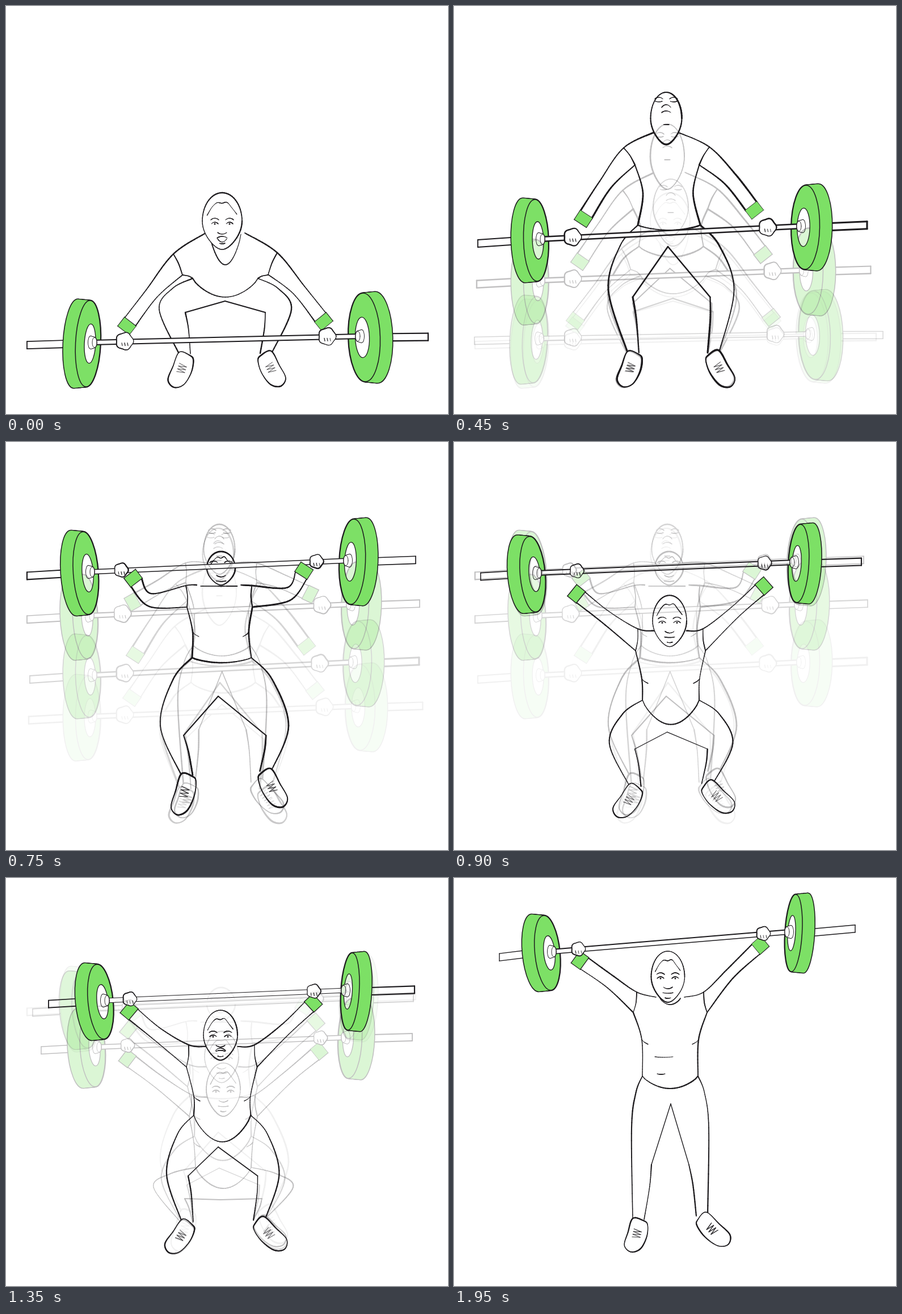
An HTML page with a canvas that plays this animation: 779 px wide and 719 px high, repeating every 2.45 s.

```html
<!DOCTYPE html>
<html lang="en">
<head>
<meta charset="utf-8">
<title>Snatch lift</title>
<style>
html, body { margin: 0; width: 100%; height: 100%; overflow: hidden; background: #fff; }
canvas { display: block; }
</style>
</head>
<body>
<canvas id="stage" width="779" height="719"></canvas>
<script>
const W = 779, H = 719, STEP = 150, LOOP = 2450;
const INK = '#1d1b1e', GREEN = '#7de066';
const stage = document.getElementById('stage').getContext('2d');
let g;

// ---- geometry ----
const add = (a, b) => [a[0] + b[0], a[1] + b[1]];
const lerp = (a, b, t) => a + (b - a) * t;
const clamp = v => Math.max(0, Math.min(1, v));
const range = (n, f) => Array.from({ length: n + 1 }, (_, i) => f(i / n));

// Unit vector from a to b, and its normal
function frame(a, b) {
  const len = Math.hypot(b[0] - a[0], b[1] - a[1]);
  const d = [(b[0] - a[0]) / len, (b[1] - a[1]) / len];
  return { len, d, n: [-d[1], d[0]] };
}

// Catmull-Rom curve through p
function smooth(p, closed) {
  const n = p.length, segs = closed ? n : n - 1;
  const at = i => closed ? p[(i + n) % n] : p[Math.max(0, Math.min(n - 1, i))];
  return range(segs * 12, v => {
    const i = Math.min(segs - 1, Math.floor(v * segs)), t = v * segs - i;
    const [a, b, c, d] = [at(i - 1), at(i), at(i + 1), at(i + 2)];
    return [0, 1].map(j => b[j] + 0.5 * t * (c[j] - a[j] + t * (2 * a[j] - 5 * b[j] + 4 * c[j] - d[j]
      + t * (3 * (b[j] - c[j]) + d[j] - a[j]))));
  });
}

// Sagging line between two points
function sag(a, b, depth) {
  return range(24, t => [lerp(a[0], b[0], t), lerp(a[1], b[1], t) + depth * Math.sin(Math.PI * t) ** 0.75]);
}

// ---- strokes ----
function trace(pts) {
  g.beginPath();
  pts.forEach(p => g.lineTo(p[0], p[1]));
}

// Ink line whose pressure drifts along the way
function pen(pts, w) {
  for (let i = 1; i < pts.length; i++) {
    trace([pts[i - 1], pts[i]]);
    g.lineWidth = w * (0.95 + 0.25 * Math.sin(i * 0.14 + pts[0][0]));
    g.stroke();
  }
}

function erase(fill) {
  g.globalCompositeOperation = 'destination-out';
  fill();
  g.globalCompositeOperation = 'source-over';
}

function hollow(pts, w) {
  trace(pts);
  erase(() => g.fill());
  pen(pts, w);
}

function oval(x, y, rx, ry, rot = 0) {
  g.beginPath();
  g.ellipse(x, y, rx, ry, rot, 0, 7);
}

// ---- barbell ----
function drum(back, front, rx, ry, rot, color, w) {
  const each = paint => range(12, t => {
    oval(lerp(back[0], front[0], t), lerp(back[1], front[1], t), rx, ry - 2 * t, rot);
    paint();
  });
  g.lineWidth = w * 2;
  each(() => g.stroke());
  g.fillStyle = color || '#000';
  if (color) each(() => g.fill());
  else erase(() => each(() => g.fill()));
  oval(front[0], front[1], rx, ry - 2, rot);
  g.lineWidth = w;
  g.stroke();
}

function rod(a, b, half, w) {
  const up = [0, -half], down = [0, half];
  hollow([add(a, up), add(b, up), add(b, down), add(a, down), add(a, up)], w);
}

function plate(hub, side, rx, ry, rot) {
  const front = add(hub, [side * 7.5, 2]);
  drum(add(front, [side * 21.5, 0]), front, rx - 1, ry - 1, rot, GREEN, 1.5);
  oval(hub[0] + side * 4, hub[1] + 2, rx * 0.43, ry * 0.44, rot);
  erase(() => g.fill());
  g.lineWidth = 1.3;
  g.stroke();
}

const slope = ({ bar }) => (bar[4] - bar[2]) / (bar[3] - bar[1]);
const barY = (p, x) => p.bar[2] + slope(p) * (x - p.bar[1]);

function barbell(p) {
  const [x0, lx, ly, rx, ry, x1] = p.bar, [size, wide, tilt] = p.disc;
  rod([x0, barY(p, x0) + 2], [lx - 30, ly + 2], 6.5, p.w);
  rod([rx + 30, ry + 2], [x1, barY(p, x1) + 4], 6.5, p.w);
  plate([lx, ly], -1, 23, size, tilt);
  plate([rx, ry], 1, wide, size + 2, -tilt * 0.6);
  rod([lx, ly], [rx, ry], 4, p.w * 0.85);
  drum([lx - 3, ly], [lx + 4, ly], 4, 11, 0, null, 0.9);
  drum([rx + 3, ry], [rx - 4, ry], 4, 11, 0, null, 0.9);
}

// ---- body: outlines are built for the left side, then mirrored ----
function arm(p, place) {
  const { d, n } = frame(p.shoulder, p.wrist);
  const fore = frame(p.elbow, p.wrist);
  const off = (c, v, k) => [c[0] + v[0] * k, c[1] + v[1] * k];
  const end = off(p.wrist, fore.d, -8);
  const draw = (pts, w) => pen(smooth(pts.map(place)), w);
  draw([p.neck, p.shoulder, off(p.elbow, n, 12), off(end, fore.n, 12)], p.w);
  draw([p.armpit, off(p.elbow, n, -11), off(end, fore.n, -12)], p.w);
  draw([p.shoulder, off(lerpPoint(p.shoulder, p.armpit, 0.5), d, -2), p.armpit], p.w * 0.8);
}

const lerpPoint = (a, b, t) => [lerp(a[0], b[0], t), lerp(a[1], b[1], t)];

function cuff(p, place) {
  const { d, n } = frame(p.elbow, p.wrist);
  const corner = (u, v) => place([0, 1].map(j => p.wrist[j] + d[j] * u * 10 + n[j] * v * 13));
  const quad = [corner(-1, -1), corner(-1, 1), corner(1, 1), corner(1, -1), corner(-1, -1)];
  trace(quad);
  g.fillStyle = GREEN;
  g.fill();
  pen(quad, 1.2);
}

function fist(p, x) {
  const y = barY(p, x), r = p.wrist[1] > barY(p, p.grip) ? 12 : 15;
  hollow(range(40, t => {
    const a = t * Math.PI * 2, k = r * (1 + 0.06 * Math.cos(5 * a));
    return [x + k * Math.cos(a), y - 1 + k * Math.sin(a)];
  }), p.w * 0.8);
  for (const i of [-1, 0, 1]) pen([[x + i * 5, y + 2], [x + i * 5 + 1, y + 7]], 1.1);
}

function leg(p, place, lift) {
  const [hx, hy] = p.hem, [kx, ky] = p.thigh;
  const ankle = side => place(add(p.ankle, [side * 10, lift]));
  pen(smooth([...[p.hem, [lerp(hx, kx, 0.6), lerp(hy, ky, 0.32)], p.thigh].map(place), ankle(-1)]), p.w);
  pen([p.crotch, place(p.knee)], p.w);
  pen(smooth([place(p.knee), lerpPoint(place(p.knee), ankle(1), 0.4).map((v, j) => v + (j ? 0 : 2)), ankle(1)]), p.w);
}

function shoe(ankle, toe, side, w) {
  const { len, d, n } = frame(ankle, toe);
  // [across, along]: outer edge, toe cap, inner edge
  const shape = [[-10, 0], [-13, 0.45], [-14, 0.85], [0, 1], [15, 0.84], [21, 0.45], [18, 0.1], [10, 0]];
  const at = ([u, v]) => [0, 1].map(j => ankle[j] - n[j] * u * side + d[j] * len * v);
  hollow(smooth(shape.map(at), true), w);
  pen(range(6, t => at([t * 12 % 4 ? 10 : -4, 0.3 + t * 0.25])), 1.1);
}

function torso(p, mirror) {
  for (const m of [q => q, mirror]) {
    pen(smooth([p.armpit, p.waist, p.hem].map(m)), p.w);
    if (p.mouth === 'flat' || p.mouth === 'strain') pen(smooth([p.waist, add(p.waist, [4, 4]), add(p.waist, [11, 8])].map(m)), 1.1);
  }
  pen(sag(p.hem, mirror(p.hem), p.drop), p.w);
  const left = add(p.neck, [7, 2]);
  pen(sag(left, mirror(left), p.collar), p.w * 0.8);
  for (const [x, y, w] of p.folds || []) pen(sag([x - w / 2, y], [x + w / 2, y], 1), 1.1);
}

function head({ head: [x, top, w, h], mouth, w: line }) {
  const up = mouth === 'up';
  hollow(range(60, t => {
    const a = t * Math.PI * 2, s = Math.sin(a);
    return [x + w / 2 * Math.cos(a) * (1 - 0.27 * Math.max(0, s) ** 2), top + h / 2 * (1 + s)];
  }), line * 0.95);

  const nose = top + h * (up ? 0.26 : 0.69);
  const arc = (cx, y, half, bend) => pen(sag([x + cx - half, nose + y], [x + cx + half, nose + y], bend), 1.3);
  for (const s of [-1, 1]) {
    arc(s * 13, up ? -8 : -14, 6, up ? 1 : -3);
    arc(s * 13, up ? -12 : -21, 7, -3);
    if (!up) { oval(x + s * 13, nose - 14, 1.5, 1.5); g.fillStyle = INK; g.fill(); }
  }
  arc(0, up ? 3 : 1, 8, up ? -5 : 3);
  if (up) { arc(0, 12, 8, -3); arc(0, 33, 5, 0); return; }
  arc(0, 11, 9, mouth === 'strain' ? -5 : mouth === 'open' ? -3 : 1);
  if (mouth !== 'flat') arc(0, 12, 8, mouth === 'open' ? 6 : -2);
  arc(0, 20, 5, 1);
  pen(smooth(range(6, t => [x + w * lerp(-0.38, 0.37, t), top + h * (0.4 - 0.23 * Math.sin(Math.PI * t) ** 0.6) + 2 * Math.sin(t * 17)])), 1.2);
}

function render(p) {
  const c = document.createElement('canvas');
  c.width = W; c.height = H;
  g = c.getContext('2d');
  g.strokeStyle = INK;
  g.lineCap = g.lineJoin = 'round';

  const same = q => q;
  const mirror = ([x, y]) => [2 * (p.axis + p.lean * (y - 400)) - x, y];
  // The far arm also rises with the slant of the bar
  const reach = q => {
    const [x, y] = mirror(q), gap = x - q[0];
    return [x, y + slope(p) * gap * clamp((gap - 130) / 100)];
  };
  const lift = (p.toeR[1] - p.toe[1]) / 2;

  torso(p, mirror);
  arm(p, same);
  arm(p, reach);
  leg(p, same, 0);
  leg(p, mirror, lift);
  shoe(p.ankle, p.toe, 1, p.w);
  shoe(add(mirror(p.ankle), [0, lift]), p.toeR, -1, p.w);
  head(p);
  barbell(p);
  cuff(p, same);
  cuff(p, reach);
  fist(p, p.grip);
  fist(p, mirror([p.grip, barY(p, p.grip)])[0] + 2);
  return c;
}

// ---- key poses: joints of the left side, in stage pixels ----
const crouch = {
  w: 2, mouth: 'open', axis: 386.5, lean: 0, head: [381, 329, 70, 100], neck: [352, 400], collar: 54,
  shoulder: [295, 437], armpit: [311, 474], elbow: [257, 507], wrist: [213, 564], grip: 209,
  waist: [322, 476], hem: [329, 480], drop: 33, crotch: [386, 520],
  thigh: [270, 535], knee: [316, 540], ankle: [315, 613], toe: [296, 672], toeR: [484, 670],
  bar: [37, 152, 593, 624, 582, 744], disc: [79, 29, 0.05]
};
const stand = {
  w: 2.6, mouth: 'up', axis: 379.5, lean: 0.033, head: [374, 152, 55, 92], neck: [354, 222], collar: 0,
  shoulder: [299, 250], armpit: [319, 280], elbow: [267, 315], wrist: [228, 375], grip: 209,
  waist: [333, 330], hem: [324, 386], drop: 9, crotch: [377, 424],
  thigh: [272, 500], knee: [315, 513], ankle: [316, 611], toe: [298, 671], toeR: [487, 671],
  bar: [42, 152, 411, 612, 388, 728], disc: [75, 26, -0.03]
};
const drop = {
  w: 2.4, mouth: 'flat', axis: 381, lean: 0.04, head: [379, 193, 50, 59], neck: [336, 252], collar: 0,
  shoulder: [317, 253], armpit: [319, 291], elbow: [254, 279], wrist: [224, 240], grip: 203,
  waist: [329, 335], hem: [328, 380], drop: 9, crotch: [374, 448],
  thigh: [272, 500], knee: [313, 517], ankle: [319, 587], toe: [302, 657], toeR: [488, 643],
  bar: [37, 148, 229, 603, 209, 722], disc: [76, 24, -0.07]
};
const squat = {
  w: 1.7, mouth: 'flat', axis: 383, lean: 0, head: [383, 326, 60, 94], neck: [355, 386], collar: 0,
  shoulder: [327, 382], armpit: [323, 420], elbow: [268, 359], wrist: [214, 318], grip: 214,
  waist: [331, 466], hem: [334, 510], drop: 37, crotch: [378, 567],
  thigh: [260, 545], knee: [315, 565], ankle: [319, 608], toe: [288, 661], toeR: [489, 646],
  bar: [62, 160, 298, 599, 281, 716], disc: [71, 22, -0.07]
};
const rise = {
  w: 1.9, mouth: 'strain', axis: 381, lean: 0.01, head: [378, 233, 60, 88], neck: [352, 297], collar: 0,
  shoulder: [322, 294], armpit: [318, 333], elbow: [267, 276], wrist: [217, 234], grip: 218,
  waist: [331, 385], hem: [331, 418], drop: 47, crotch: [374, 474],
  thigh: [283, 522], knee: [321, 525], ankle: [320, 606], toe: [287, 660], toeR: [491, 654],
  bar: [75, 174, 216, 599, 198, 720], disc: [69, 17, -0.1]
};
const finish = {
  w: 1.9, mouth: 'flat', axis: 381, lean: 0, head: [377, 129, 59, 90], neck: [356, 210], collar: 11,
  shoulder: [322, 201], armpit: [316, 237], elbow: [276, 184], wrist: [222, 145], grip: 219,
  waist: [331, 285], hem: [332, 349], drop: 22, crotch: [382, 398],
  thigh: [313, 440], knee: [348, 505], ankle: [325, 602], toe: [312, 659], toeR: [483, 646],
  bar: [80, 172, 130, 591, 95, 707], disc: [69, 16, -0.1], folds: [[370, 315, 32], [365, 345, 14]]
};

// In-betweens
function mix(a, b, t) {
  const ease = (u, v) => Array.isArray(u) ? u.map((x, i) => lerp(x, v[i], t)) : typeof u === 'number' ? lerp(u, v, t) : u;
  return Object.fromEntries(Object.keys(a).map(k => [k, ease(a[k], b[k])]));
}
const start = { ...mix(stand, crouch, 0.95), head: [382, 305, 62, 100], collar: 30, bar: [36, 150, 586, 628, 578, 756] };
const pull = { ...mix(stand, crouch, 0.4), head: [376, 208, 60, 115], collar: 0 };
const high = {
  ...mix(stand, finish, 0.75), head: [376, 145, 55, 88], collar: 0,
  elbow: [273, 254], wrist: [223, 282], grip: 205, bar: [37, 147, 306, 608, 286, 729], disc: [77, 25, -0.05]
};
const under = { ...mix(squat, rise, 0.6), bar: [47, 146, 231, 600, 212, 718] };

// ---- timeline: each step is a pose followed by its fading trail ----
const sheets = {};
Object.entries({ a: crouch, b: start, c: pull, d: stand, e: high, f: drop, g: under, h: squat, i: rise, j: finish })
  .forEach(([k, p]) => { sheets[k] = render(p); });

const trail = 'a ba cba dcba edcb fedc gfed hgfe hgfe ihgf jih jih ji j'.split(' ');
const fade = [1, 0.27, 0.18, 0.06];

function draw(ms) {
  const step = Math.min(trail.length - 1, Math.floor(ms / STEP)), keys = trail[step];
  const held = step > 10 ? step - 10 : 0;
  stage.globalAlpha = 1;
  stage.fillStyle = '#fff';
  stage.fillRect(0, 0, W, H);
  for (let i = keys.length - 1; i >= 0; i--) {
    stage.globalAlpha = i ? fade[Math.min(3, i + held - (held > 0))] : 1;
    stage.drawImage(sheets[keys[i]], 0, 0);
  }
}

const t0 = performance.now();
function tick() {
  draw((performance.now() - t0) % LOOP);
  requestAnimationFrame(tick);
}
tick();
</script>
</body>
</html>
```
